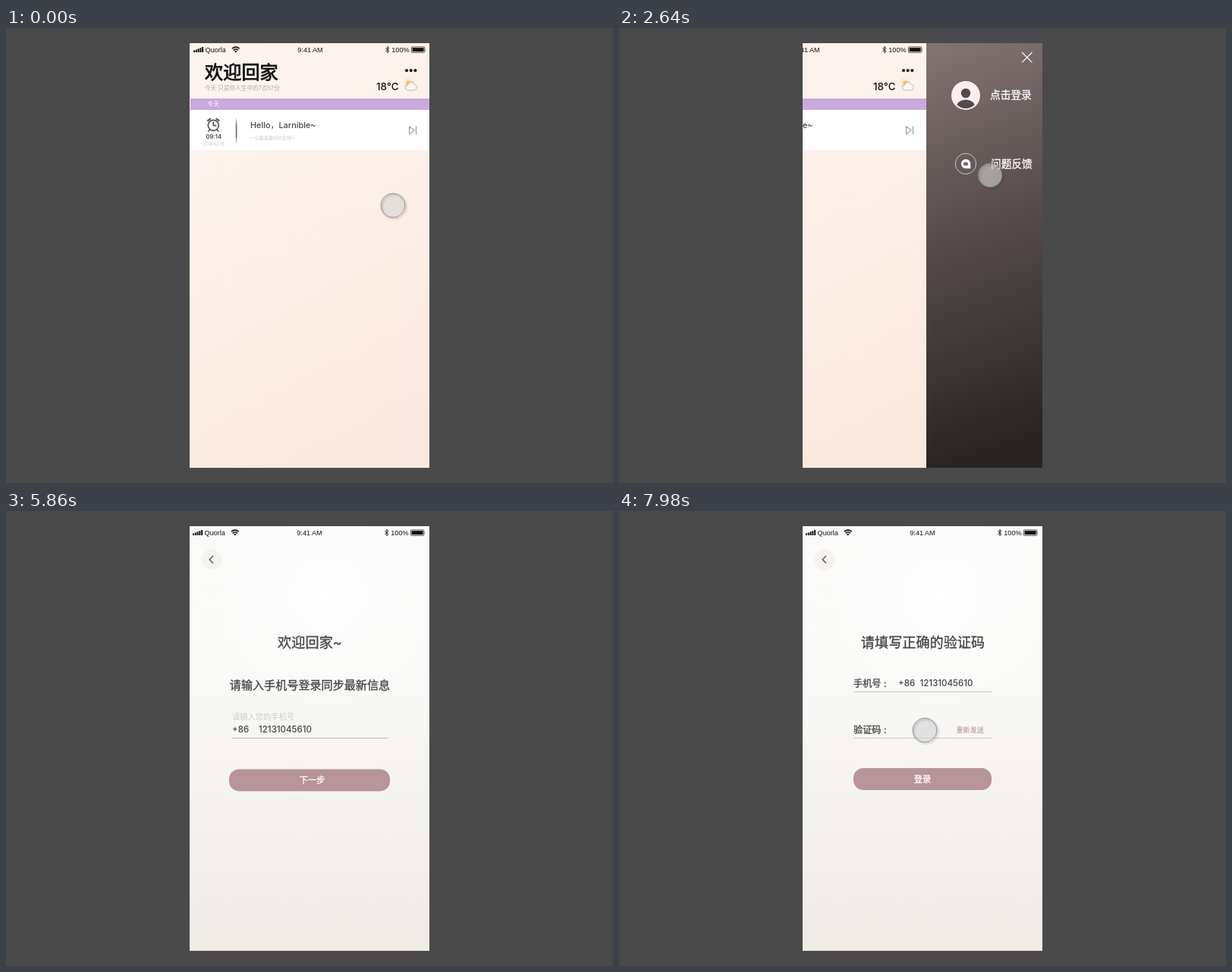
An HTML page that plays this animation: 800x600 px, repeating every 8000 ms.

```html
<!DOCTYPE html>
<html lang="zh-CN">
<head>
<meta charset="utf-8">
<title>欢迎回家</title>
<style>
  html, body { margin: 0; width: 100%; height: 100%; overflow: hidden; background: #4a4a4a; }
  #stage { display: block; width: 800px; height: 600px; }
  text { font-family: Inter, "Noto Sans CJK SC", "Noto Sans CJK JP", "Noto Sans CJK", sans-serif; }
  .status text { font: 9.1px "Liberation Sans", sans-serif; fill: #111; }
  .mid { text-anchor: middle; }
  .medium { stroke: currentColor; stroke-width: .3px; }
  .digits { font-size: 11.5px; font-weight: 500; }
  .ink { fill: #444; color: #444; }
  .white { fill: #fff; color: #fff; }
  .line { fill: none; stroke-linecap: round; stroke-linejoin: round; }

  .home, .row-login, .row-feedback, .login, .verify, .label, .phone, .cursor {
    animation: 8s linear infinite;
  }
  .home { animation-name: home; }
  .row-login { animation-name: row-login; }
  .row-feedback { animation-name: row-feedback; }
  .login { animation-name: login; }
  .verify { animation-name: verify; }
  .label { animation-name: label; }
  .phone { animation-name: phone; }
  .cursor { animation-name: cursor; }

  /* Screens and rows settle along an exponential-like curve lasting 440 ms. */
  @keyframes home {
    0% { transform: translateX(0); }
    20.25% { transform: translateX(0); animation-timing-function: cubic-bezier(.1, .58, .28, 1); }
    25.75%, 100% { transform: translateX(-153px); }
  }
  @keyframes row-login {
    0% { transform: translateX(-150px); }
    20.25% { transform: translateX(-150px); animation-timing-function: cubic-bezier(.1, .58, .28, 1); }
    25.75%, 100% { transform: translateX(0); }
  }
  @keyframes row-feedback {
    0% { transform: translateX(-150px); }
    24.375% { transform: translateX(-150px); animation-timing-function: cubic-bezier(.1, .58, .28, 1); }
    29.875%, 100% { transform: translateX(0); }
  }
  @keyframes login {
    0% { transform: translateX(316px); }
    38% { transform: translateX(316px); animation-timing-function: cubic-bezier(.1, .58, .28, 1); }
    43.5%, 100% { transform: translateX(0); }
  }
  @keyframes verify {
    0% { transform: translateX(316px); }
    83.25% { transform: translateX(316px); animation-timing-function: cubic-bezier(.1, .58, .28, 1); }
    88.75%, 100% { transform: translateX(0); }
  }
  @keyframes label {
    0% { transform: translate(332.5px, 292.5px) scale(1); }
    55.25% { transform: translate(332.5px, 292.5px) scale(1); animation-timing-function: cubic-bezier(.1, .58, .28, 1); }
    60.75%, 100% { transform: translate(298px, 274.8px) scale(.85); }
  }
  @keyframes phone {
    0%, 66.75% { opacity: 0; }
    68.25%, 100% { opacity: 1; }
  }
  @keyframes cursor {
    0% { transform: translate(510px, 234px); }
    11.75% { transform: translate(510px, 234px); animation-timing-function: cubic-bezier(.3, .3, .2, 1); }
    18.25% { transform: translate(536px, 54px); }
    22.5% { transform: translate(536px, 54px); animation-timing-function: ease-in; }
    25.75% { transform: translate(515px, 123px); animation-timing-function: ease-out; }
    30.5% { transform: translate(541px, 331px); animation-timing-function: ease-in-out; }
    35.25%, 41.5% { transform: translate(446.5px, 82px); animation-timing-function: ease-in-out; }
    48.25% { transform: translate(409px, 282px); animation-timing-function: ease-out; }
    51%, 53% { transform: translate(388px, 277px); animation-timing-function: ease-in; }
    55.5% { transform: translate(434.5px, 278px); }
    60.75% { transform: translate(582px, 258px); }
    73% { transform: translate(582px, 300px); animation-timing-function: ease-out; }
    82.25% { transform: translate(425px, 356px); }
    83.25% { transform: translate(425px, 356px); animation-timing-function: ease-in; }
    84.75% { transform: translate(468px, 347px); }
    88.25% { transform: translate(582px, 340px); }
    95% { transform: translate(582px, 282px); animation-timing-function: ease-out; }
    99.75%, 100% { transform: translate(403px, 289px); }
  }
</style>
</head>
<body>
<svg id="stage" viewBox="0 0 800 600">
  <defs>
    <linearGradient id="peach" x1=".35" y1="0" x2=".65" y2="1">
      <stop offset="0" stop-color="#fdf3ef"/>
      <stop offset=".5" stop-color="#fcefe7"/>
      <stop offset="1" stop-color="#fae8de"/>
    </linearGradient>
    <linearGradient id="dusk" x1=".4" y1="0" x2=".6" y2="1">
      <stop offset="0" stop-color="#857675"/>
      <stop offset=".5" stop-color="#544a49"/>
      <stop offset="1" stop-color="#282424"/>
    </linearGradient>
    <linearGradient id="paper" x1="0" y1="0" x2="0" y2="1">
      <stop offset="0" stop-color="#fafaf9"/>
      <stop offset=".35" stop-color="#f9f9f7"/>
      <stop offset="1" stop-color="#eeeae6"/>
    </linearGradient>
    <radialGradient id="glow" gradientUnits="userSpaceOnUse" cx="425" cy="110" r="150">
      <stop offset="0" stop-color="#fff"/>
      <stop offset="1" stop-color="#fff" stop-opacity="0"/>
    </radialGradient>
    <linearGradient id="divider" x1="0" y1="0" x2="0" y2="1">
      <stop offset="0" stop-color="#777" stop-opacity=".2"/>
      <stop offset=".3" stop-color="#666"/>
      <stop offset=".7" stop-color="#666"/>
      <stop offset="1" stop-color="#777" stop-opacity=".2"/>
    </linearGradient>
    <filter id="shadow" x="-30%" y="-30%" width="160%" height="160%">
      <feDropShadow dx="1.5" dy="1.5" stdDeviation="1.2" flood-color="#000" flood-opacity=".6"/>
    </filter>

    <g id="status" class="status">
      <path d="M247 29.5h2v2.5h-2zM249.8 28.5h2v3.5h-2zM252.6 27.3h2v4.7h-2zM255.4 26.2h2v5.8h-2zM258.2 25h2v7h-2z" fill="#111"/>
      <text x="262.6" y="32">Quorla</text>
      <path d="M297.8 27.3Q302.8 23 307.8 27.3M299.6 29.3Q302.8 26.7 306 29.3" fill="none" stroke="#111" stroke-width="1.5"/>
      <path d="M300.9 30.7Q302.8 29.2 304.7 30.7L302.8 32.5z" fill="#111"/>
      <text x="401" y="32" class="mid">9:41 AM</text>
      <path d="M500.5 26.4L505 30.5 502.8 32.6V24.4L505 26.5 500.5 30.6" class="line" stroke="#111" stroke-width=".9"/>
      <text x="508.3" y="32">100%</text>
      <rect x="534.4" y="24.9" width="17.4" height="7.4" rx="1" fill="none" stroke="#111" stroke-width=".7"/>
      <rect x="535.6" y="26.1" width="15" height="5" fill="#111"/>
      <path d="M552.6 27.2q1.2 1.4 0 2.8z" fill="#111"/>
    </g>
    <g id="sheet">
      <rect x="242" y="20" width="316" height="560" fill="url(#paper)"/>
      <rect x="242" y="20" width="316" height="260" fill="url(#glow)"/>
      <use href="#status" x="-1"/>
      <circle cx="271" cy="64" r="13.5" fill="#f4f1ee"/>
      <path d="M272.6 59.6L268.1 64l4.5 4.4" class="line" stroke="#555" stroke-width="1.4"/>
    </g>
  </defs>

  <rect width="800" height="600" fill="#4a4a4a"/>
  <svg x="242" y="20" width="316" height="560" viewBox="242 20 316 560">
    <g id="menu">
      <rect x="242" y="20" width="316" height="560" fill="url(#dusk)"/>
      <path d="M531.5 32.5l12.6 12.6m0-12.6l-12.6 12.6" class="line" stroke="#fff" stroke-width="1.2"/>
      <g class="row-login">
        <circle cx="457" cy="89" r="19" fill="#fbeeef"/>
        <circle cx="457" cy="86" r="6.2" fill="#544a4a"/>
        <path d="M445.5 101.5C447 92.5 467 92.5 468.5 101.5Q463 106 457 106T445.5 101.5z" fill="#544a4a"/>
        <text x="489" y="93.4" font-size="13.7" class="white medium">点击登录</text>
      </g>
      <g class="row-feedback">
        <circle cx="457" cy="179" r="13.6" fill="none" stroke="#d8d2d2" stroke-width=".9"/>
        <path d="M457 173a6.2 6.2 0 0 1 6.3 6.2v6h-6.3a6.1 6.1 0 0 1 0-12.2z" fill="#fff"/>
        <rect x="454" y="177" width="6" height="4.5" rx="1.5" fill="#75696a"/>
        <text x="490" y="184.4" font-size="13.7" class="white medium">问题反馈</text>
      </g>
    </g>

    <g class="home">
      <rect x="242" y="20" width="316" height="560" fill="url(#peach)"/>
      <use href="#status"/>
      <text x="262" y="66.7" font-size="24.2" fill="#111" color="#111" class="medium" style="stroke-width:.8px">欢迎回家</text>
      <text x="262" y="82" font-size="7.6" fill="#aaa">今天 只是你人生中的7点57分</text>
      <g fill="#111">
        <circle cx="528" cy="56" r="2.1"/><circle cx="533.7" cy="56" r="2.1"/><circle cx="539.4" cy="56" r="2.1"/>
      </g>
      <text x="488" y="81.5" font-size="13.4" font-weight="500" fill="#111">18°C</text>
      <circle cx="531" cy="73" r="3.7" fill="#f8c15c"/>
      <circle cx="531" cy="73" r="5.5" fill="none" stroke="#f4b850" stroke-width="1.3" stroke-dasharray="1.1 3.22"/>
      <path d="M529.5 82a3.4 3.4 0 0 1-.3-6.7 4.8 4.8 0 0 1 9-1 3.9 3.9 0 0 1-.4 7.7z" fill="#fdf6f2" stroke="#b5b0ae" stroke-width=".9"/>

      <rect x="243" y="93" width="315" height="15" fill="#c9a9db"/>
      <text x="265.5" y="103.4" font-size="7.7" class="white">今天</text>
      <rect x="242" y="108" width="316" height="53" fill="#fff"/>
      <g class="line" stroke="#555" stroke-width="1.7">
        <circle cx="273.3" cy="128.3" r="7"/>
        <path d="M273.3 124v4.6h3.4M268.5 134l-1.5 2M278.1 134l1.5 2"/>
        <path d="M266 122.2l3-2.3M280.6 122.2l-3-2.3" stroke-width="2.2"/>
      </g>
      <text x="273.8" y="146" font-size="7.6" font-weight="600" class="ink mid">09:14</text>
      <text x="273.5" y="155.2" font-size="5.8" fill="#c4c4c4" class="mid">2018.02.19</text>
      <rect x="302.8" y="119" width="1.6" height="33" fill="url(#divider)"/>
      <text x="322" y="132" font-size="10.9" font-weight="500" class="ink">Hello，Larnible~</text>
      <text x="322" y="147.2" font-size="6" fill="#c8c8c8">一切都是最好的安排~</text>
      <path d="M531.5 130v9.8l6.7-4.9zM540.5 129.8v10.2" class="line" stroke="#999" stroke-width="1.1"/>
    </g>

    <g class="login">
      <use href="#sheet"/>
      <text x="400.5" y="180" font-size="18.2" class="ink mid medium">欢迎回家~</text>
      <text x="400.5" y="235.3" font-size="15.1" class="ink mid medium">请输入手机号登录同步最新信息</text>
      <text x="298" y="292.3" class="ink digits">+86</text>
      <g class="label"><text font-size="12.1" fill="#cbcbca">请输入您的手机号</text></g>
      <g class="phone"><text x="333" y="292.3" class="ink digits">12131045610</text></g>
      <path d="M298 299.5h205" stroke="#bdbbba"/>
      <rect x="294" y="340.4" width="212" height="29" rx="13" fill="#b79499"/>
      <text x="403.7" y="359" font-size="11.3" class="white mid medium">下一步</text>
    </g>

    <g class="verify">
      <use href="#sheet"/>
      <text x="400.5" y="180" font-size="18.15" class="ink mid medium">请填写正确的验证码</text>
      <text x="309" y="231.6" font-size="12.2" class="ink medium">手机号 :</text>
      <text x="368" y="231.3" class="ink digits">+86</text>
      <text x="396.5" y="231.3" class="ink digits">12131045610</text>
      <text x="309" y="292.6" font-size="12.2" class="ink medium">验证码 :</text>
      <text x="444.5" y="291.7" font-size="9.1" fill="#b08a90">重新发送</text>
      <path d="M309 238.5h182M309 299.5h182" stroke="#c6c4c2"/>
      <rect x="309" y="339" width="182" height="29" rx="13" fill="#b79499"/>
      <text x="400" y="357.7" font-size="11.3" class="white mid medium">登录</text>
    </g>

    <g class="cursor">
      <circle r="16" fill="#d4d2d3" fill-opacity=".6"/>
      <circle r="16" fill="none" stroke="#666" stroke-opacity=".65" stroke-width=".9" filter="url(#shadow)"/>
    </g>
  </svg>
</svg>
</body>
</html>
```
